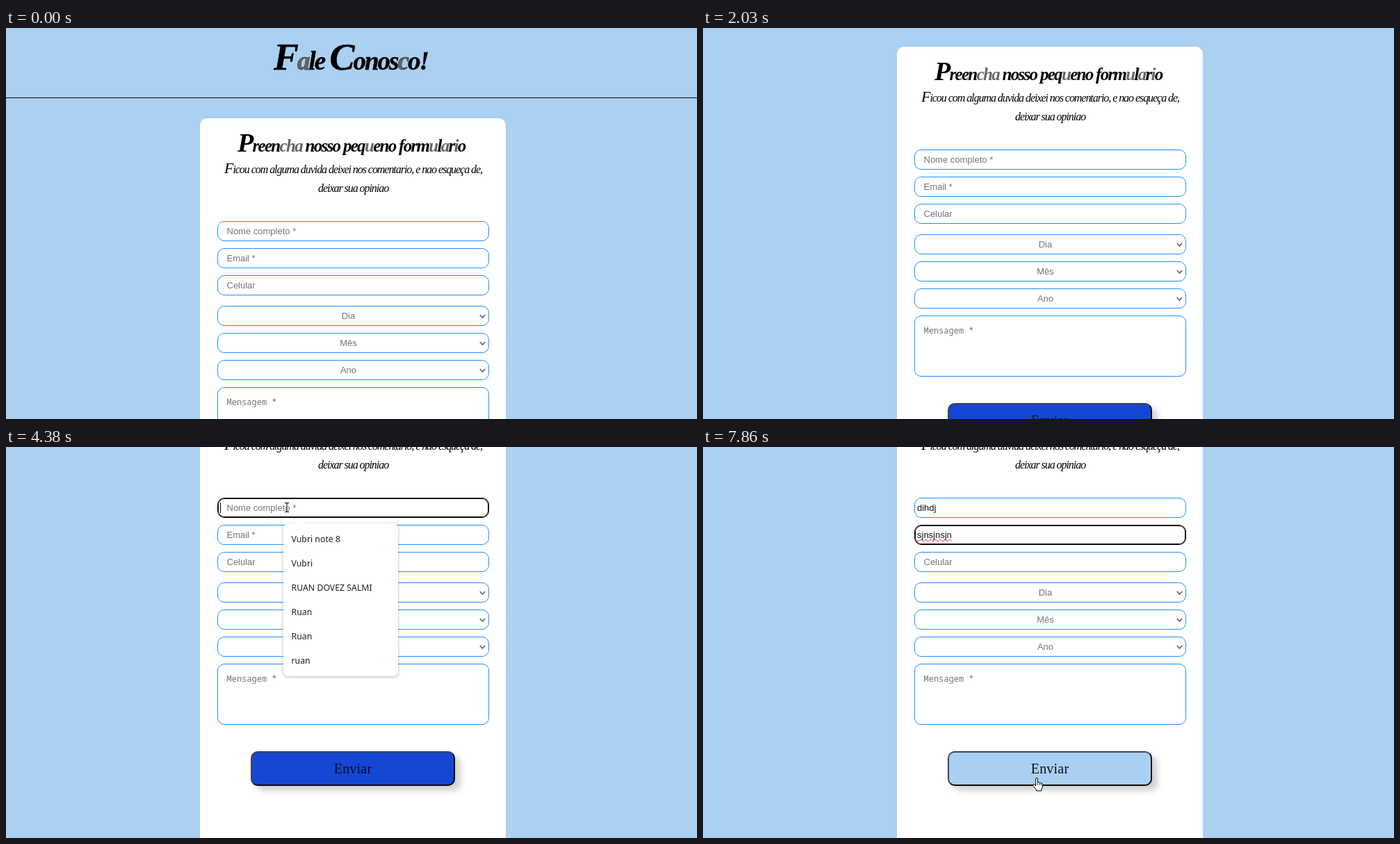
An HTML page that plays this animation: 994x563 px, repeating every 8 s.

```html
<!DOCTYPE html>
<html lang="pt-BR">
<head>
<meta charset="utf-8">
<title>Fale Conosco</title>
<style>
  html, body { margin: 0; width: 100%; height: 100%; overflow: hidden; background: #aad0f2; }
  #stage { position: relative; width: 994px; height: 563px; overflow: hidden; background: #aad0f2; }
  #page { position: absolute; left: 0; top: 0; width: 994px; height: 900px; }
  #page > * { position: absolute; box-sizing: border-box; }
  #rule { left: 0; top: 100px; width: 994px; height: 1px; background: #0c0c18; }
  #card { left: 279px; top: 130px; width: 440px; height: 760px; border-radius: 10px; background: #fff; }
  #lettering { left: 0; top: 0; font-family: "Liberation Serif", serif; font-style: italic; }
  #lettering .pale { fill: #666; }
  .field {
    left: 304px; width: 391px; height: 29px; padding-left: 3px;
    display: flex; align-items: center;
    border: 1px solid #1e90ff; border-radius: 10px; background: #fff;
    font: 13px "Liberation Sans", Arial, sans-serif; color: #111; white-space: pre;
  }
  .field.focus { border-color: #0b0b0b; box-shadow: inset 0 0 0 1px #0b0b0b; }
  .field .hint { position: absolute; left: 12.5px; color: #757575; }
  .field .caret { width: 1.4px; height: 15px; background: #000; }
  .select { justify-content: center; padding: 0 14px 0 0; color: #757575; }
  .select svg { position: absolute; right: 4.5px; top: 11px; }
  .area { height: 88px; }
  .area .hint { top: 12px; font: 12px/17px "Noto Sans Mono", monospace; }
  .wrong { text-decoration: underline wavy #e3262b 1px; text-decoration-skip-ink: none; text-underline-offset: 1px; }
  #send {
    left: 352px; top: 643px; width: 294px; height: 50px;
    border: 2px solid; border-color: #3f4650 #0a0a0a #0a0a0a #3f4650; border-radius: 10px;
    background: #1447d4; box-shadow: 8px 7px 8px #d2d2d2;
    font: 20px/46px "Liberation Serif", serif; letter-spacing: .2px; text-align: center; color: #0a0f24;
  }
  #send.hover { background: #a9d0f3; }
  #menu {
    position: absolute; left: 399px; top: 110px; padding: 5px 0; border-radius: 7px;
    background: #fff; box-shadow: 0 1px 4px rgba(0, 0, 0, .28);
    font: 12.3px/35px "Noto Sans", sans-serif; color: #1f1f1f;
  }
  #menu::before {
    content: ""; position: absolute; left: 15px; top: -6px;
    border: 7px solid transparent; border-top: 0; border-bottom: 6px solid #fff;
  }
  #menu div { padding-left: 11.5px; height: 35px; white-space: pre; }
  #cursor { position: absolute; left: 0; top: 0; width: 24px; height: 24px; overflow: visible; }
</style>
</head>
<body>
<div id="stage">
  <div id="page">
    <div id="rule"></div>
    <div id="card"></div>
    <svg id="lettering" width="994" height="260">
      <g font-weight="bold" stroke="#000" stroke-width=".4">
        <text x="385" y="60" font-size="37" letter-spacing="-2"><tspan font-size="54">F</tspan><tspan class="pale">a</tspan>le <tspan font-size="54">C</tspan>onos<tspan class="pale">c</tspan>o!</text>
        <text x="333" y="178" font-size="25" letter-spacing="-1.7" stroke="none"><tspan font-size="38">P</tspan>reen<tspan class="pale">cha</tspan> nosso peq<tspan class="pale">u</tspan>eno form<tspan class="pale">u</tspan>l<tspan class="pale">a</tspan>r<tspan class="pale">i</tspan>o</text>
      </g>
      <g font-size="16" letter-spacing="-1.05">
        <text x="314" y="209"><tspan font-size="22">F</tspan>icou com alguma duvida deixei nos comentario, e nao esqueça de,</text>
        <text x="449" y="236">deixar sua opiniao</text>
      </g>
    </svg>
    <div id="send">Enviar</div>
  </div>
  <div id="menu"></div>
  <svg id="cursor">
    <path id="arrow" d="M0 0V14.5L3.4 11.4L5.8 17L8.2 16L5.8 10.6H10.4Z" fill="#fff" stroke="#000" stroke-width=".9"/>
    <g id="beam" fill="none">
      <path d="M-3-6.5H-1L0-5.8L1-6.5H3M0-5.8V5.8M-3 6.5H-1L0 5.8L1 6.5H3" stroke="#fff" stroke-width="2.6"/>
      <path d="M-3-6.5H-1L0-5.8L1-6.5H3M0-5.8V5.8M-3 6.5H-1L0 5.8L1 6.5H3" stroke="#000" stroke-width="1.1"/>
    </g>
    <g id="hand" stroke="#000" stroke-linejoin="round" stroke-linecap="round">
      <path d="M-1.4 10.5V1Q-1.4-.5 0-.5Q1.4-.5 1.4 1V6Q3.6 4.8 4.2 6.5Q6.2 5.6 6.6 7.3Q8.3 6.7 8.4 8.6V12Q8.2 14.5 6.8 16V18H-.6V16.2Q-3 13.6-5.3 10.2Q-5.5 8.3-3.6 8.5Z" fill="#fff"/>
      <path d="M1.4 6V9.5M4.2 6.8V9.6M6.6 7.6V10" fill="none" stroke-width=".8"/>
    </g>
  </svg>
</div>
<script>
const LOOP = 8000;
const $ = id => document.getElementById(id);

function add(parent, tag, cls, text = '') {
  const el = document.createElement(tag);
  el.className = cls;
  el.textContent = text;
  parent.appendChild(el);
  return el;
}

function field(top, hintText, cls = '') {
  const box = add($('page'), 'div', 'field ' + cls);
  box.style.top = top + 'px';
  return {
    box,
    hint: add(box, 'span', 'hint', hintText),
    value: add(box, 'span', 'value'),
    caret: add(box, 'i', 'caret')
  };
}

const chevron = '<svg width="9" height="7"><path d="M.8 1L4.5 5L8.2 1" fill="none" stroke="#666" stroke-width="1.8"/></svg>';
const nameField = field(278, 'Nome completo *');
const mailField = field(317, 'Email *');
const others = [field(356, 'Celular'), field(517, 'Mensagem *', 'area')];
others.forEach(f => f.caret.remove());
['Dia', 'Mês', 'Ano'].forEach((label, i) => {
  const box = add($('page'), 'div', 'field select', label);
  box.style.top = 400 + 39 * i + 'px';
  box.insertAdjacentHTML('beforeend', chevron);
});

// Evenly timed steps from t0 to t1, one per value
const steps = (t0, t1, values) =>
  values.map((v, i) => [t0 + (values.length > 1 ? (t1 - t0) * i / (values.length - 1) : 0), v]);

// Value of the last step reached at time t
const at = (list, t) => list.reduce((v, s) => t >= s[0] ? s[1] : v, list[0][1]);

const scroll = [
  [0, 0],
  ...steps(1480, 2230, [4, 20, 38, 56, 66, 75, 84, 93, 103, 120, 136, 150]),
  ...steps(2300, 2630, [158, 174, 189, 199, 203.5, 205])
];

// t0, t1, step count, end x, end y
const moves = [
  [2910, 2980, 2, 411, 172],
  [3180, 3310, 3, 395, 129],
  [3510, 3850, 6, 404, 87],
  [7050, 7390, 6, 413, 214],
  [7530, 7860, 6, 480, 477]
];
const pointer = [[0, null], [2840, [774, 412]]];
for (const [t0, t1, n, x, y] of moves) {
  const [x0, y0] = pointer[pointer.length - 1][1];
  const path = Array.from({ length: n }, (_, i) => {
    const p = (i + 1) / n, e = p * p * (3 - 2 * p);
    return [x0 + (x - x0) * e, y0 + (y - y0) * e];
  });
  pointer.push(...steps(t0, t1, path));
}

const nameText = [[0, ''], [4580, 'd'], ...steps(4720, 4850, ['di', 'dih', 'dihd']), [4990, 'dihdj']];
const mailText = [
  [0, ''],
  ...steps(5850, 6120, ['s', 'sjn', 'sjnsj', 'sjnsjnsj', 'sjnsjnsjn']),
  ...steps(6260, 6320, ['sjnsjn', 'sjnsjnsjn'])
];
const menus = [
  [0, null],
  [4180, { width: 165, rows: ['Vubri note 8', 'Vubri', 'RUAN DOVEZ SALMI', 'Ruan', 'Ruan', 'ruan'] }],
  [4580, { width: 187, rows: ['duvida sobre a aula', 'duvida'] }],
  [4720, null]
];

function shapeAt(x, y) {
  const inside = (l, t, r, b) => x > l && x < r && y > t && y < b;
  if (inside(352, 438, 646, 488)) return 'hand';
  const overText = [[73, 102], [112, 141], [151, 180], [312, 400]].some(([t, b]) => inside(304, t, 695, b));
  return overText ? 'beam' : 'arrow';
}

function showField(f, text, focus, caretOn) {
  f.value.textContent = text;
  f.hint.style.display = text ? 'none' : '';
  f.box.classList.toggle('focus', focus);
  f.caret.style.visibility = focus && caretOn ? 'visible' : 'hidden';
}

let shownMenu;
function showMenu(menu) {
  if (menu === shownMenu) return;
  shownMenu = menu;
  const el = $('menu');
  el.style.display = menu ? '' : 'none';
  el.textContent = '';
  if (!menu) return;
  el.style.width = menu.width + 'px';
  menu.rows.forEach(r => add(el, 'div', '', r));
}

function render(t) {
  $('page').style.transform = `translateY(${-at(scroll, t)}px)`;

  const caretOn = t < 6850 || (t >= 7350 && t < 7860);
  showField(nameField, at(nameText, t), t >= 4180 && t < 5450, caretOn);
  showField(mailField, at(mailText, t), t >= 5450, caretOn);
  mailField.value.classList.toggle('wrong', t >= 7320);
  showMenu(at(menus, t));

  const pos = at(pointer, t);
  const shape = pos && shapeAt(...pos);
  $('cursor').style.display = pos ? '' : 'none';
  if (pos) $('cursor').style.transform = `translate(${pos[0]}px, ${pos[1]}px)`;
  for (const id of ['arrow', 'beam', 'hand']) $(id).style.display = id === shape ? '' : 'none';
  $('send').classList.toggle('hover', shape === 'hand');
}

const start = performance.now();
function tick() {
  render((performance.now() - start) % LOOP);
  requestAnimationFrame(tick);
}
tick();
</script>
</body>
</html>
```
